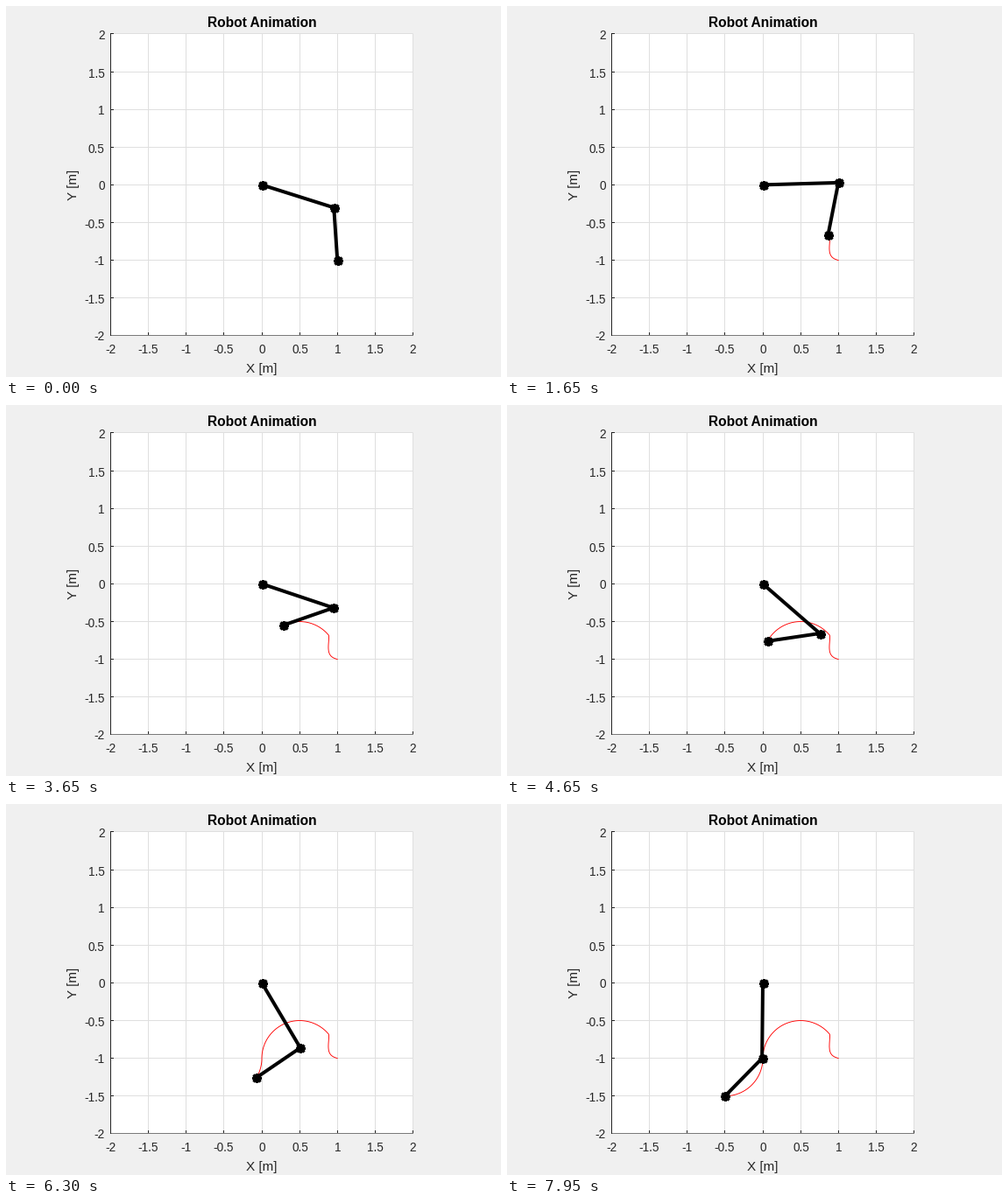
These frames come from a looping animation (565x424 px, 8 s). A matplotlib script:

```python
import numpy as np
import matplotlib.pyplot as plt
from matplotlib.animation import FuncAnimation

W, H, DPI = 565, 424, 100
PX = 72 / DPI                      # points per pixel
L1, L2 = 1.0, 0.7                  # link lengths
STEPS, HOLD, SETTLE = 150, 9, 22
INK, GRID = "#262626", "#dfdfdf"

plt.rcParams["font.family"] = "Liberation Sans"


def to_px(x, y):
    return 292 + 86.25 * np.asarray(x), 204.4 - 86.25 * np.asarray(y)


def path_point(k):
    """S-curve made of two half-metre arcs."""
    a = np.radians(1.8 * k)
    if k <= 100:
        return 0.5 + 0.5 * np.cos(a), -1 + 0.5 * np.sin(a)
    a -= np.pi
    return -0.5 + 0.5 * np.cos(a), -1 - 0.5 * np.sin(a)


def shoulder_lag(k):
    """Start-up error of the first joint, in radians."""
    if k >= SETTLE:
        return 0.0
    return np.radians(-0.69 * k * (1 - (k / SETTLE) ** 2) ** 1.3)


def pose(k):
    x, y = path_point(k)
    q2 = -np.arccos((x * x + y * y - L1**2 - L2**2) / (2 * L1 * L2))
    q1 = np.arctan2(y, x) - np.arctan2(L2 * np.sin(q2), L1 + L2 * np.cos(q2))
    q1 += shoulder_lag(k)
    ex, ey = L1 * np.cos(q1), L1 * np.sin(q1)
    return (0, ex, ex + L2 * np.cos(q1 + q2)), (0, ey, ey + L2 * np.sin(q1 + q2))


def pixel_centre(v):
    return np.floor(np.asarray(v) + 1e-6) + 0.5


poses = [to_px(*pose(k)) for k in range(STEPS + 1)]
tip = np.array([(x[2], y[2]) for x, y in poses])

fig = plt.figure(figsize=(W / DPI, H / DPI), dpi=DPI, facecolor="#f0f0f0")
ax = fig.add_axes([0, 0, 1, 1])
ax.set(xlim=(0, W), ylim=(H, 0))
ax.axis("off")


def line(xs, ys, color, z):
    ax.plot(xs, ys, color=color, lw=PX, zorder=z, solid_capstyle="butt", snap=False)


def label(x, y, s, size, ha="center", **kw):
    ax.text(x, y, s, fontsize=size * PX, ha=ha, va="baseline", **kw)


left, right, top, bottom = 119.5, 464.5, 31.5, 376.5
ax.fill([left, right, right, left], [top, top, bottom, bottom], "white",
        lw=0, zorder=0, snap=False)

for v in np.arange(-2, 2.1, 0.5):
    x, y = pixel_centre(to_px(v, v))
    line([x, x], [top, bottom], GRID, 1)
    line([left, right], [y, y], GRID, 1)
    line([x, x], [bottom, bottom - 3.5], INK, 2)
    line([left, left + 3.5], [y, y], INK, 2)
    label(x, 397, f"{v:g}", 13.6, color=INK)
    label(112.7, y + 6, f"{v:g}", 13.6, ha="right", color=INK)
line([left, right], [bottom, bottom], "#7a7a7a", 2)
line([left, left], [top - 0.5, bottom + 0.5], INK, 3)

label(292, 24, "Robot Animation", 15.5, weight="bold", color="black")
label(292, 419, "X [m]", 15.3, color=INK)
ax.text(81, 204, "Y [m]", fontsize=15.3 * PX, color=INK, rotation=90,
        rotation_mode="anchor", ha="center", va="baseline")

trace, = ax.plot([], [], color="red", lw=0.9 * PX, zorder=4, snap=False)
links, = ax.plot([], [], color="black", lw=4 * PX, zorder=5,
                 solid_capstyle="butt", snap=False)
joints, = ax.plot([], [], color="black", ls="none", zorder=6, marker=(8, 2, 0),
                  ms=11 * PX, mew=3.1 * PX, snap=False)


def draw(i):
    k = max(0, i - HOLD)
    links.set_data(*poses[k])
    joints.set_data(*pixel_centre(poses[k]))
    trace.set_data(tip[:k + 1, 0], tip[:k + 1, 1])
    return trace, links, joints


anim = FuncAnimation(fig, draw, frames=STEPS + HOLD + 1, interval=50,
                     repeat=True, repeat_delay=0, blit=False)
plt.show()
```
